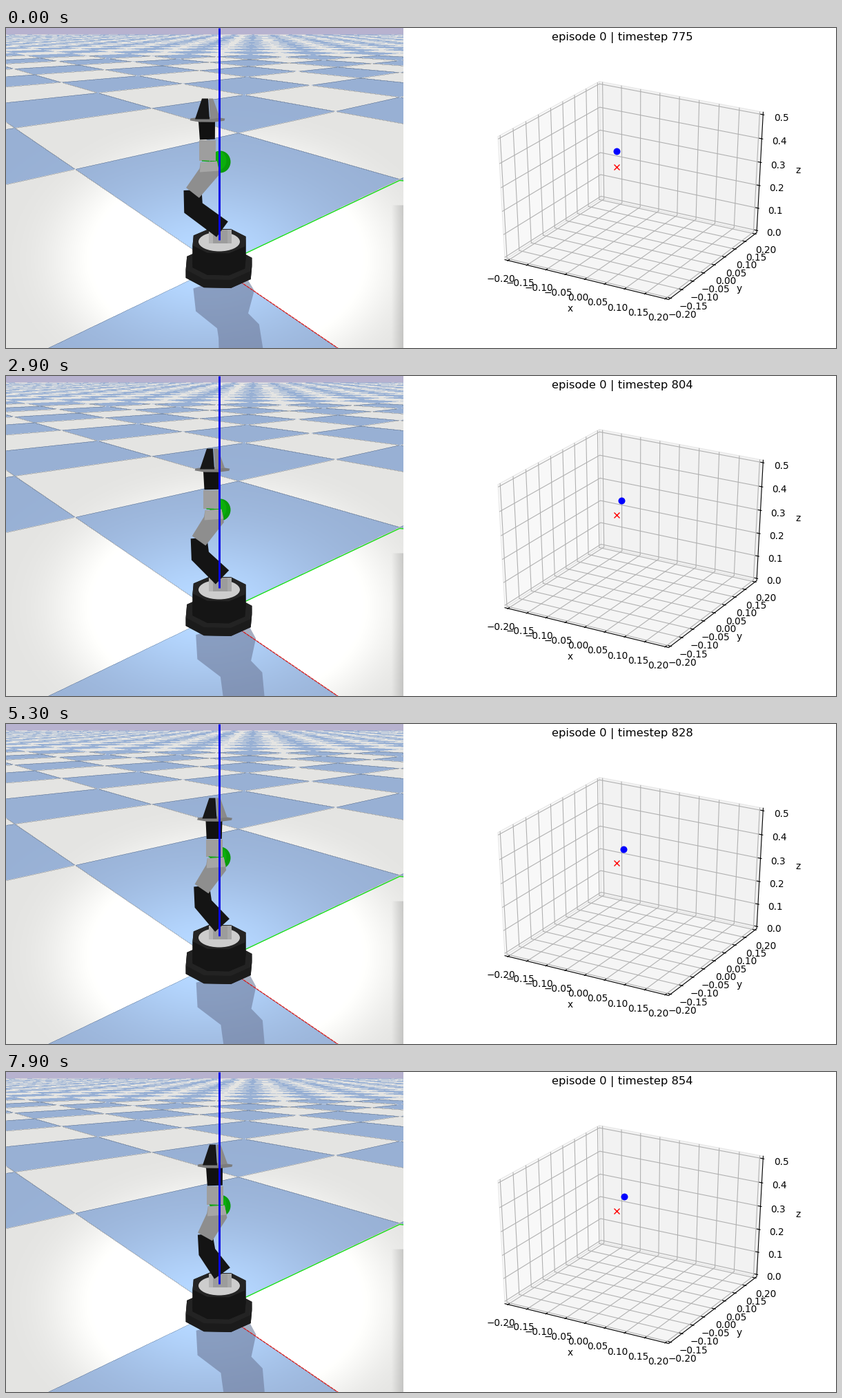
Animation, 1203 px wide and 465 px high, one loop 8000 ms. Source, as a matplotlib script:

```python
import numpy as np
import matplotlib.pyplot as plt
from matplotlib.animation import FuncAnimation
from matplotlib.collections import LineCollection
from matplotlib.patches import Ellipse, Polygon

W, H, DPI = 1203, 465, 64
PX = 72 / DPI            # points per pixel
SCENE_W = 576
FRAMES, INTERVAL = 80, 100

plt.rcParams["font.family"] = "DejaVu Sans"
fig = plt.figure(figsize=(W / DPI, H / DPI), dpi=DPI, facecolor="white")
ax = fig.add_axes([0, 0, 1, 1])
ax.axis("off")


# ---------- drawing helpers ----------
def poly(points, color, z, **kw):
    patch = Polygon(points, closed=True, facecolor=color, lw=0, zorder=z, **kw)
    ax.add_patch(patch)
    return patch


def oval(x, y, w, h, color, z):
    ax.add_patch(Ellipse((x, y), w, h, color=color, lw=0, zorder=z))


def line(points, color, width, z, **kw):
    x, y = zip(*points)
    ax.plot(x, y, color=color, lw=width * PX, zorder=z, **kw)


def segments(paths, color, width, z):
    ax.add_collection(LineCollection(paths, colors=color, linewidths=width * PX, zorder=z))


def label(x, y, text, size=13.6):
    return ax.text(x, y, text, fontsize=size * PX, ha="center", va="baseline",
                   color="black", zorder=20)


def octagon(x, y, rx, ry):
    t = np.radians(25 + 45 * np.arange(8))
    return np.c_[x + rx * np.cos(t), y + ry * np.sin(t)]


def prism(top, height, color, top_color, z):
    """Upright block below an octagonal lid."""
    drop = np.array([0, height])
    for p, q in zip(top, np.roll(top, -1, 0)):
        poly([p, q, q + drop, p + drop], color, z)
    poly(top + drop, color, z)
    poly(top, top_color, z + 0.5)


def limb(points, half_widths):
    """Outline of a thick bent bar running through the points."""
    p = np.array(points, float)
    steps = np.diff(p, axis=0)
    steps /= np.hypot(*steps.T)[:, None]
    along = np.vstack([steps[:1], steps[:-1] + steps[1:], steps[-1:]])
    along /= np.hypot(*along.T)[:, None]
    side = np.c_[-along[:, 1], along[:, 0]] * np.array(half_widths)[:, None]
    return np.vstack([p + side, (p - side)[::-1]])


# ---------- checkered floor ----------
ORIGIN = np.array([306.5, 346])
HORIZON, REACH, FOCAL = -3, 0.89, 608


def tile_parity(x, y):
    """0 on blue tiles and 1 on white ones, for a camera yawed by 50 degrees."""
    left, right = np.radians(40), np.radians(50)
    vanish_a = [ORIGIN[0] - FOCAL * np.tan(left), HORIZON, 1]
    vanish_b = [ORIGIN[0] + FOCAL * np.tan(right), HORIZON, 1]
    to_screen = np.c_[np.multiply(vanish_a, REACH * np.cos(left)),
                      np.multiply(vanish_b, REACH * np.cos(right)),
                      [*ORIGIN, 1]]
    a, b, w = (r[0] * x + r[1] * y + r[2] for r in np.linalg.inv(to_screen))
    return (np.floor(a / w) + np.floor(b / w)) % 2


def floor_image():
    ss = 2
    x, y = np.meshgrid((np.arange(SCENE_W * ss) + 0.5) / ss - 0.5,
                       (np.arange(H * ss) + 0.5) / ss - 0.5)
    white = tile_parity(x, y)[..., None]
    glow = np.exp(-((x - 290) / 180) ** 2 - ((y - 340) / 115) ** 2)[..., None]
    flare = np.exp(-(((x - 320) / 240) ** 2 + ((y - 335) / 165) ** 2) ** 2.5)[..., None]
    blue = np.array([152, 176, 212]) + glow * np.array([32, 43, 48])
    pale = np.array([228, 228, 226]) + flare * 42
    edge = np.where(y > 257, np.clip((x - 558) / 17, 0, 1), 0)[..., None]
    img = np.where(white > 0, pale.clip(0, 255) * (1 - 0.14 * edge), blue)
    img = np.where((y < 9)[..., None], np.array([183, 178, 207]), img)
    img = img.reshape(H, ss, SCENE_W, ss, 3).mean(axis=(1, 3))

    # thin dark seams between the nearer tiles
    tiles = tile_parity(*np.meshgrid(np.arange(SCENE_W), np.arange(H)))
    seam = (tiles != np.roll(tiles, 1, 0)) | (tiles != np.roll(tiles, 1, 1))
    seam[:40] = seam[:, 0] = False
    img[seam] *= 0.83
    return img.clip(0, 255) / 255


ax.imshow(floor_image(), extent=(-0.5, SCENE_W - 0.5, H - 0.5, -0.5), aspect="auto",
          interpolation="nearest", zorder=0)
ax.set_xlim(-0.5, W - 0.5)
ax.set_ylim(H - 0.5, -0.5)

line([ORIGIN, (481, 465)], "#e01818", 1.2, 2, ls=(0, (4, 0.7)))
line([ORIGIN, (570, 221), (575, 221.5)], "#10e010", 1.3, 2)

# ---------- robot base, target ball, vertical axis ----------
prism(octagon(308, 342, 51, 25), 12, "#1b1b1b", "#232323", 3)
prism(octagon(308.5, 309, 41, 19), 32, "#151515", "#242424", 4)
oval(308.5, 310, 60, 28, "#cdcdcd", 6)
for x, width, color in ((298, 10, "#b4b4b4"), (310, 22, "#9c9c9c"), (323, 6, "#a8a8a8")):
    poly(limb([(x, 292), (x, 312)], [width / 2, width / 2]), color, 7)

oval(310, 194, 30, 32, "#0a9c0a", 7)
oval(308, 192, 22, 27, "#0cae0c", 7)
line([(308, -1), (308, 307)], "#0808e6", 3, 15, solid_capstyle="butt")

# ---------- moving arm ----------
BLANK = [(0, 0), (1, 0), (0, 1)]
PART_COLORS = {"lower": "#141414", "upper": "#8e8e8e", "shoulder": "#a6a6a6",
               "forearm": "#9e9e9e", "ball_gap": "#1fa81f", "wrist": "#111111",
               "plate": "#7c7c7c", "finger_dark": "#171717", "finger_grey": "#8a8a8a"}
parts = {name: poly(BLANK, color, 8 + 0.5 * i)
         for i, (name, color) in enumerate(PART_COLORS.items())}
shadow = poly(BLANK, "#6f7c9c", 1, alpha=0.62)

# time: elbow x, gripper plate x and y
POSES = {0: (270, 291.5, 132), 19: (264.5, 289.5, 134), 29: (279, 298.5, 135),
         40: (268, 298, 138), 45: (273.5, 301.5, 138), 53: (283, 302, 137),
         66: (289, 301, 131), 79: (288, 302.5, 135)}


def pose(n):
    return [np.interp(n, list(POSES), track) for track in zip(*POSES.values())]


def arm_shapes(elbow, px, py):
    lean = elbow - 270
    fx, fy = px + 0.15 * lean - 0.25 * (px - 291), py + 30.5
    tip = py - 30
    return {
        "lower": limb([(elbow, 235), (elbow + 1 + 0.1 * lean, 261), (313, 292)],
                      [13 - 0.13 * lean, 15 - 0.13 * lean, 14]),
        "upper": limb([(elbow, 239), (fx + 3, 208), (fx + 2, 194)], [12, 15, 12]),
        "shoulder": limb([(fx + 3, 208), (fx + 2, 194)], [14, 12]),
        "forearm": limb([(fx, 192), (fx, fy)], [12, 12]),
        "ball_gap": limb([(fx - 8, 192.5), (fx + 3, 193)], [0.8, 0.8]),
        "wrist": limb([(fx, fy - 1), (px - 1, py + 3)], [11, 12]),
        "plate": octagon(px, py + 0.5, 27, 4),
        "finger_dark": [(px - 8, tip), (px + 1, tip), (px + 3, py), (px - 18, py)],
        "finger_grey": [(px + 8, tip), (px + 2, tip), (px + 4, py), (px + 18, py - 2)],
    }


def shadow_shape(elbow):
    s = 0.5 * np.clip(elbow - 270, -10, 10)
    return limb([(307 + s, 366), (317 + s / 2, 396), (328 + s, 425),
                 (337 + s, 440), (340 + s, 468)], [38, 45, 25, 31, 32 - s / 2])


# ---------- 3D plot ----------
ELEV, AZIM, DIST = np.radians(30), np.radians(-60), 10
CENTER, SCALE = (908, 230), (2631, 1962)
EDGE = 25 / 48           # half size of the padded unit box


def project(x, y, z):
    across = -x * np.sin(AZIM) + y * np.cos(AZIM)
    near = x * np.cos(AZIM) + y * np.sin(AZIM)
    up = z * np.cos(ELEV) - near * np.sin(ELEV)
    depth = DIST - near * np.cos(ELEV) - z * np.sin(ELEV)
    return CENTER[0] + SCALE[0] * across / depth, CENTER[1] - SCALE[1] * up / depth


def path(*points):
    """Project points given in units of the padded box edge."""
    return [project(*(EDGE * np.array(p))) for p in points]


def axis_point(axis, t, pad):
    """Point at t on an axis, pushed outwards from the box by pad."""
    far = EDGE + pad
    return project(*{"x": (t, -far, -far), "y": (far, t, -far), "z": (far, far, t)}[axis])


left_pane = path((-1, -1, -1), (-1, 1, -1), (-1, 1, 1), (-1, -1, 1))
back_pane = path((-1, 1, -1), (1, 1, -1), (1, 1, 1), (-1, 1, 1))
floor_pane = path((-1, -1, -1), (1, -1, -1), (1, 1, -1), (-1, 1, -1))
for pane, color in ((left_pane, "#f8f8f8"), (back_pane, "#f2f2f2"), (floor_pane, "#f5f5f5")):
    poly(pane, color, 1)
    segments([pane + pane[:1]], "#e6e6e6", 1, 2)

grid, ticks = [], []
IN, OUT = 0.968, 1.016
TICK_PAD, NAME_PAD = 0.0738, 0.1604


def add_ticks(axis, values, places, drop):
    for t, value in zip(np.linspace(-0.5, 0.5, len(values)), values):
        u = t / EDGE
        grid.append({"x": path((u, -1, -1), (u, 1, -1), (u, 1, 1)),
                     "y": path((1, u, -1), (-1, u, -1), (-1, u, 1)),
                     "z": path((-1, -1, u), (-1, 1, u), (1, 1, u))}[axis])
        ticks.append({"x": path((u, -OUT, -1), (u, -IN, -1)),
                      "y": path((OUT, u, -1), (IN, u, -1)),
                      "z": path((OUT, 1, u), (IN, 1, u))}[axis])
        x, y = axis_point(axis, t, TICK_PAD)
        label(x, y + drop, f"{value:.{places}f}".replace("-", "\u2212"))
    x, y = axis_point(axis, 0, NAME_PAD)
    label(x, y + 4.5, axis)


steps = np.arange(-4, 5) * 0.05
add_ticks("x", steps, 2, 12)
add_ticks("y", steps, 2, 12)
add_ticks("z", np.arange(6) / 10, 1, 11)
segments(grid, "#b0b0b0", 1.09, 3)
segments(ticks, "black", 1.09, 5)
line(path((-1, -1, -1), (1, -1, -1), (1, 1, -1), (1, 1, 1)), "black", 1.09, 4)

title = label(892.5, 18, "", 16.37)
ax.plot([884], [201.5], "x", color="red", ms=7.5 * PX, mew=1.4 * PX, zorder=9)
dot, = ax.plot([], [], "o", color="blue", ms=10 * PX, mew=0, zorder=10)


# ---------- animation ----------
def update(n):
    elbow, px, py = pose(n)
    for name, points in arm_shapes(elbow, px, py).items():
        parts[name].set_xy(points)
    shadow.set_xy(shadow_shape(elbow))
    dot.set_data([883.5 + 1.03 * (px - 291)], [180 + 0.6 * (py - 134)])
    title.set_text(f"episode 0 | timestep {775 + n}")
    return [*parts.values(), shadow, dot, title]


anim = FuncAnimation(fig, update, frames=FRAMES, interval=INTERVAL,
                     repeat=True, repeat_delay=0, blit=False)
plt.show()
```
